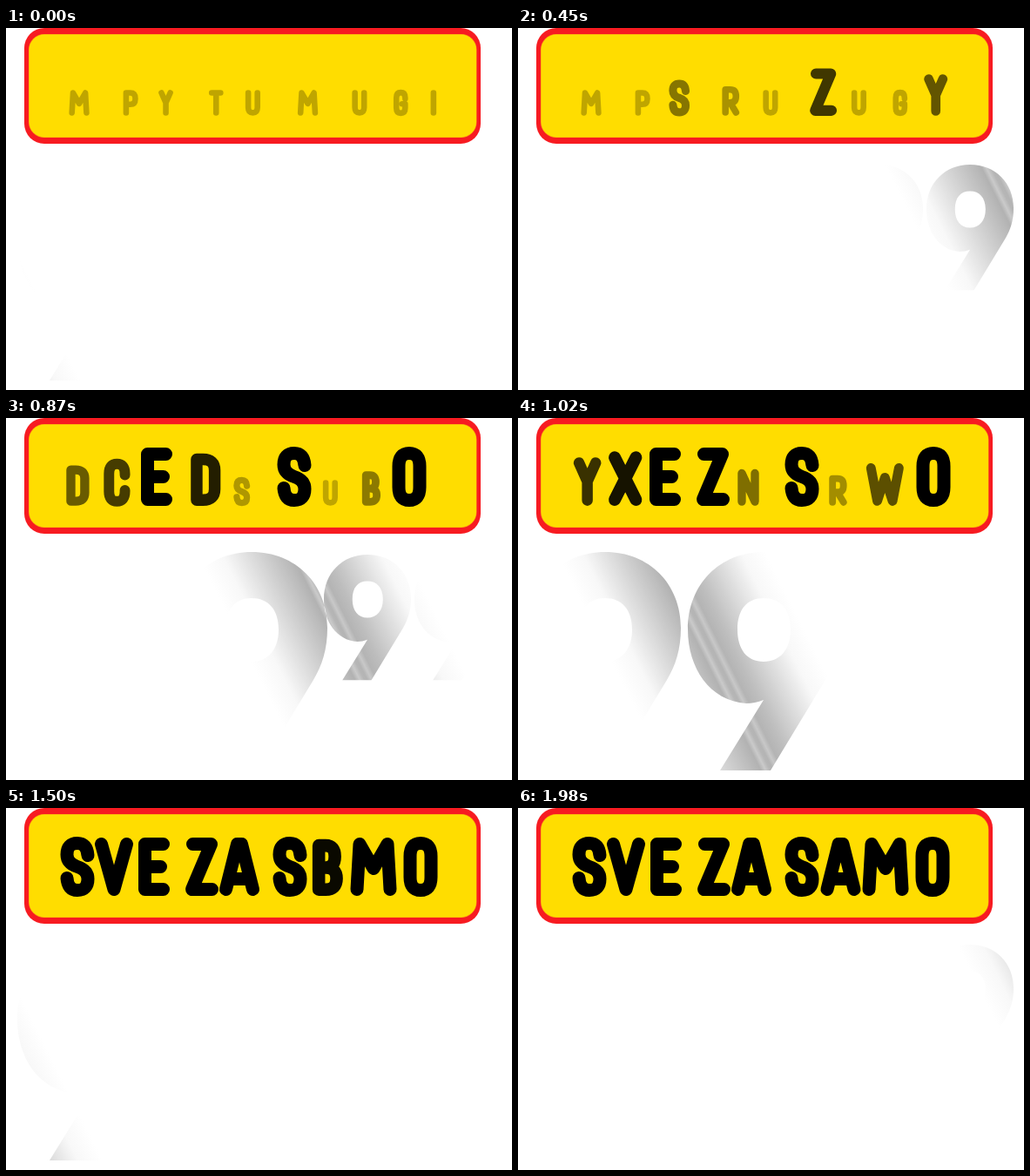
These frames come from a looping animation (581 by 416 pixels, 6240 ms). An HTML page with a canvas:

```html
<!DOCTYPE html>
<html lang="hr">
<head>
<meta charset="utf-8">
<title>Sve za samo</title>
<style>
html, body { margin: 0; width: 100%; height: 100%; overflow: hidden; background: #fff; }
canvas { display: block; }
</style>
</head>
<body>
<canvas id="stage" width="581" height="416"></canvas>
<script>
const ctx = document.getElementById('stage').getContext('2d');
const LOOP = 6240, STEP = 30, END = 1980;

// Lettering: rounded strokes, [left bearing, advance, centre line], 66 px tall
const bowl = 'M7 59V7H18Q31 7 31 22T18 37H7';
const hook = 'M30 22V20Q30 6 18.5 6T7 20V46Q7 60 18.5 60T30 46';
const ring = 'M7 21Q7 6 19 6T31 21V45Q31 60 19 60T7 45Z';
const glyphs = {
  A: [1, 44, 'M7 59L20 7H25L38 59M14 47H31'],
  B: [5, 44, 'M7 7V59H15Q28 59 28 46T15 33H7M15 33Q26 33 26 20T15 7H7'],
  C: [4, 43, hook + 'V44'],
  D: [5, 45, 'M7 7V59H15Q30 59 30 45V21Q30 7 15 7Z'],
  E: [6.5, 41, 'M28 7H7V59H28M7 33H25'],
  F: [5, 39, 'M28 7H7V59M7 33H25'],
  G: [4, 46, hook + 'V36H22'],
  H: [5, 47, 'M7 7V59M31 7V59M7 33H31'],
  I: [5, 23, 'M7 7V59'],
  J: [1, 43, 'M31 7V44Q31 59 19 59T7 46'],
  K: [5.5, 47, 'M7 7V59M36 7L13 33L36 59'],
  L: [5, 38, 'M7 7V59H28'],
  M: [5, 62, 'M7 59L10 7L26 35L42 7L45 59'],
  N: [4, 45, 'M7 59V7L31 59V7'],
  O: [4, 45, ring],
  P: [5, 43, bowl],
  Q: [3.5, 45, ring + 'M22 48L32 62'],
  R: [4, 45, bowl + 'M18 37L31 59'],
  S: [2, 42, 'M31 20Q30 6 19 6Q7 6 7 19Q7 29 19 33T31 47Q31 60 19 60Q8 60 7 46'],
  T: [1, 39.5, 'M7 7H30M18.5 7V59'],
  U: [5, 44, 'M7 7V45Q7 59 19 59T31 45V7'],
  V: [-0.5, 43, 'M7 7L21.5 59L36 7'],
  W: [2, 62, 'M7 7L17 59L29 22L41 59L51 7'],
  X: [1.5, 43, 'M7 7L33 59M33 7L7 59'],
  Y: [0.5, 41, 'M7 7L18.5 33L30 7M18.5 33V59'],
  Z: [3, 41, 'M8 7H29L7 59H30']
};
for (const g of Object.values(glyphs)) g[2] = new Path2D(g[2]);

const MESSAGE = 'SVE ZA SAMO', SPACE = 16.5, SHIFT = 20;
const order = [5, 4, 2, 3, 7, 0, 8, 6, 1];   // turn in which each letter settles

const clamp = v => Math.max(0, Math.min(1, v));
const mix = (a, b, k) => a + (b - a) * k;

function drawBadge() {
  const box = (x, y, w, h, r, color) => {
    ctx.fillStyle = color;
    ctx.beginPath();
    ctx.roundRect(x, y, w, h, r);
    ctx.fill();
  };
  box(21, 0, 524, 133, 23, '#f71b21');
  box(26, 7, 514.5, 119, 18, '#fb9a10');
  box(26.6, 7.6, 513.3, 117.8, 17.4, '#ffdd00');
}

function drawMessage(t) {
  let x = 61, i = 0;
  ctx.lineWidth = 15;
  ctx.lineCap = ctx.lineJoin = 'round';
  for (const ch of MESSAGE) {
    if (ch === ' ') { x += SPACE; continue; }
    const rest = 1 - clamp((t - 50 - 110 * order[i++]) / 600);
    const code = (ch.charCodeAt(0) - 65 + Math.round(SHIFT * rest)) % 26;
    const [left, advance, path] = glyphs[String.fromCharCode(65 + code)];
    const pivot = glyphs[ch][1] * 0.4;
    const scale = mix(1, 0.44, rest);
    ctx.save();
    ctx.translate(x + pivot, 100.5);
    ctx.scale(scale, scale);
    ctx.translate(left - pivot, -66);
    ctx.strokeStyle = `rgba(0,0,0,${mix(1, 0.25, rest)})`;
    ctx.stroke(path);
    ctx.restore();
    x += advance;
  }
}

// Digit nine around the centre of its bowl
const nine = new Path2D(
  'M-50 164L0 83Q-10 87 -20 87C-62 84 -87 46 -87 2C-87 -50 -50 -87 0 -87' +
  'C51 -87 87 -50 87 0C87 25 81 43 71 60L8 164Z' +
  'M0 -34C-19 -34 -30 -21 -30 2S-19 39 0 39S31 25 31 2S19 -34 0 -34Z');
const digits = new Path2D();
for (const [x, y, s] of [[100, 241, 1], [282, 241, 1], [415, 207, 0.575], [519, 207, 0.575]])
  digits.addPath(nine, new DOMMatrix([s, 0, 0, s, x, y]));

// Slanted glint running right, left and right again
function glintAt(t) {
  if (t < 555) return mix(-237, 626, t / 555);
  if (t < 1406) return mix(626, -360, (t - 555) / 851);
  return mix(-360, 546, (t - 1406) / 574);
}

function drawDigits(t) {
  const x = glintAt(t) - 120;
  const grad = ctx.createLinearGradient(x, 0, x + 192, -96);
  const shades = [[0, 255], [0.12, 248], [0.42, 186], [0.455, 178], [0.478, 202], [0.5, 182],
    [0.515, 180], [0.535, 200], [0.56, 180], [0.62, 190], [0.88, 248], [1, 255]];
  for (const [at, v] of shades) grad.addColorStop(at, `rgb(${v},${v},${v})`);
  ctx.fillStyle = grad;
  ctx.fill(digits, 'evenodd');
}

function draw(now) {
  const time = now % LOOP;
  const t = time < 60 ? 0 : Math.min(END, Math.floor(time / STEP) * STEP);
  ctx.fillStyle = '#fff';
  ctx.fillRect(0, 0, 581, 416);
  drawDigits(t);
  drawBadge();
  drawMessage(t);
}

let start;
function tick(now) {
  start ??= now;
  draw(Math.max(0, now - start));
  requestAnimationFrame(tick);
}
draw(0);
requestAnimationFrame(tick);
</script>
</body>
</html>
```
